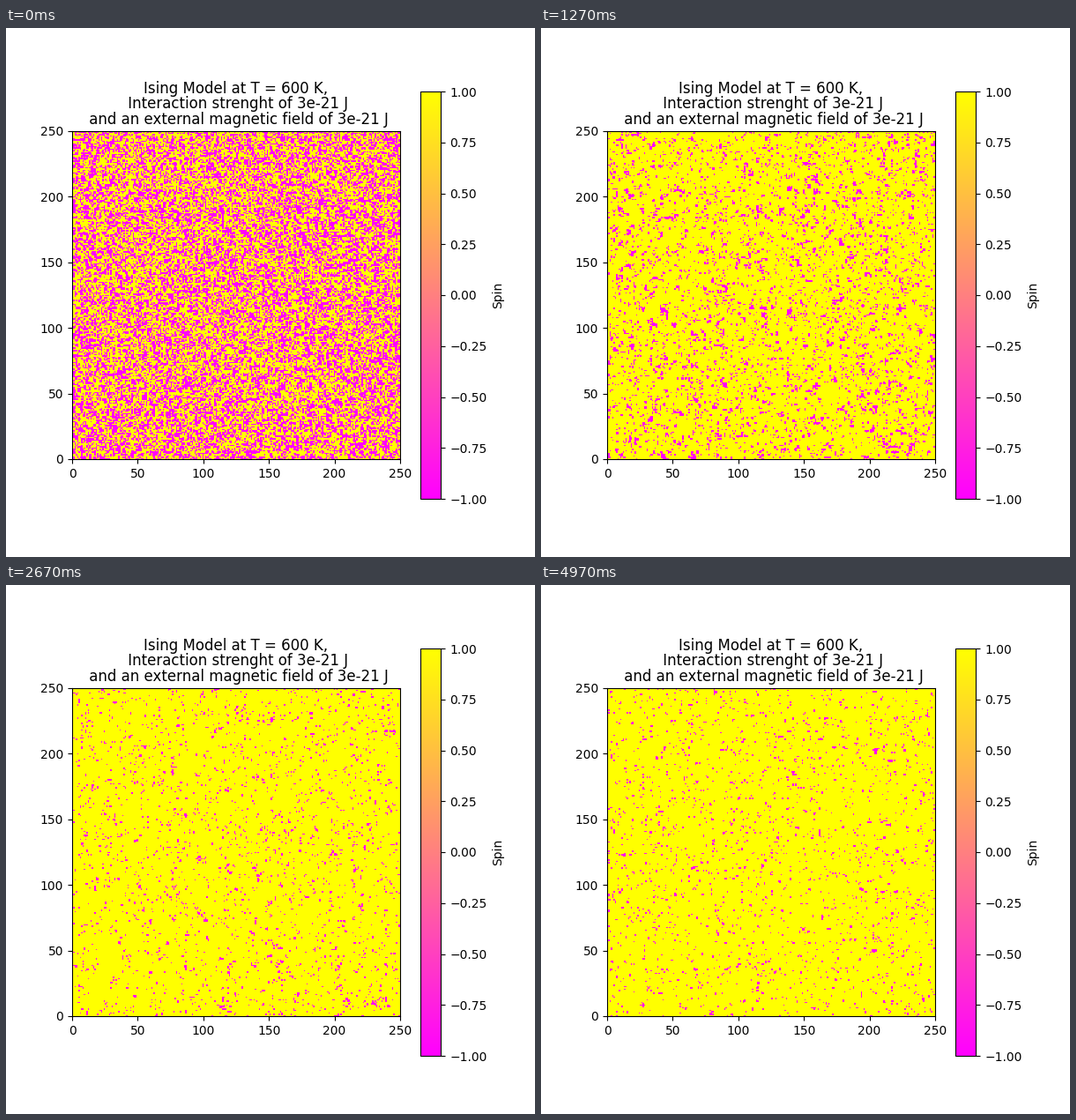
Animation of 600x600 px, one loop 5 s. Source, as a matplotlib script:

```python
import numpy as np
import matplotlib.pyplot as plt
from matplotlib.animation import FuncAnimation

N = 250                 # lattice side
FRAMES = 150
LOOP_MS = 5000
T = 600                 # K
J = 3e-21               # interaction strength, J
H = 3e-21               # external field, J
KT = 1.380649e-23 * T
PICK = 0.09             # share of sites tried per step
WARMUP = 4              # steps taken before the first picture

rng = np.random.default_rng(7)
rows, cols = np.indices((N, N))
parity = (rows + cols) % 2


def step(spins):
    """Try a random share of the sites with the Metropolis rule."""
    for color in (0, 1):
        near = sum(np.roll(spins, d, axis) for d in (-1, 1) for axis in (0, 1))
        cost = 2 * spins * (J * near + H)
        accept = rng.random((N, N)) < np.exp(-np.maximum(cost, 0) / KT)
        tried = (parity == color) & (rng.random((N, N)) < PICK)
        spins = np.where(tried & accept, -spins, spins)
    return spins


def simulate():
    states = [rng.choice([-1.0, 1.0], size=(N, N))]
    while len(states) < WARMUP + FRAMES:
        states.append(step(states[-1]))
    return states[WARMUP:]


states = simulate()

fig, ax = plt.subplots(figsize=(6, 6), dpi=100)
mesh = ax.imshow(states[0], cmap="spring", vmin=-1, vmax=1, origin="lower",
                 extent=(0, N, 0, N), interpolation="nearest")
ax.set_xticks(range(0, N + 1, 50))
ax.set_yticks(range(0, N + 1, 50))
ax.set_title(f"Ising Model at T = {T} K,\n Interaction strenght of {J} J"
             f"\n and an external magnetic field of {H} J", linespacing=0.95)
fig.colorbar(mesh, ax=ax, label="Spin")


def update(i):
    mesh.set_data(states[i])
    return [mesh]


anim = FuncAnimation(fig, update, frames=FRAMES, interval=LOOP_MS / FRAMES,
                     repeat=True)
plt.show()
```
